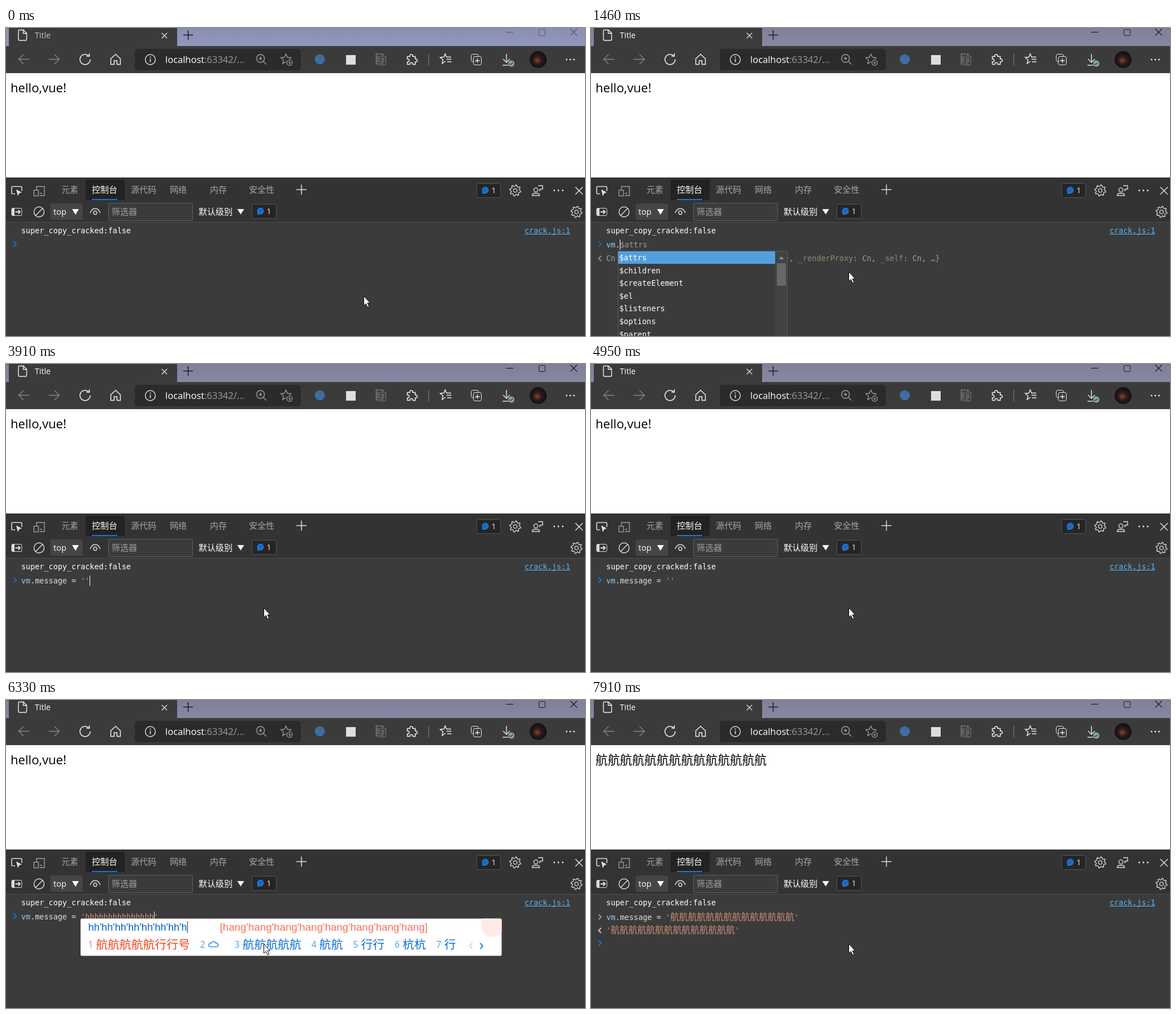
These frames come from a looping animation (1025x546 px, 8000 ms). An HTML page with a canvas:

```html
<!DOCTYPE html>
<html lang="zh-CN">
<head>
<meta charset="utf-8">
<title>Console demo</title>
<style>
html, body { margin: 0; width: 100%; height: 100%; overflow: hidden; background: #3b3b3b; }
canvas { display: block; width: 1025px; height: 546px; }
</style>
</head>
<body>
<canvas id="stage" width="1025" height="546"></canvas>
<script>
const g = document.getElementById('stage').getContext('2d');
const LOOP = 8000;
const UI = '"Open Sans", "Noto Sans CJK SC", "Noto Sans CJK", sans-serif';
const MONO = '"DejaVu Sans Mono", "Noto Sans CJK SC", "Noto Sans CJK", monospace';
const ARIAL = '"Liberation Sans", "Noto Sans CJK SC", sans-serif';
const CH = 8.1, LEFT = 27;
const STR = '#ce9178', LIGHT = '#dcdcdc', GREY = '#9a9a9a', BLUE = '#1a73d9';
const HANG = '航'.repeat(14);

// ---- drawing helpers ----
function box(x, y, w, h, fill) {
  g.fillStyle = fill;
  g.fillRect(x, y, w, h);
}
function round(x, y, w, h, r, fill, line) {
  g.beginPath();
  g.roundRect(x, y, w, h, r);
  if (fill) { g.fillStyle = fill; g.fill(); }
  if (line) { g.strokeStyle = line; g.lineWidth = 1; g.stroke(); }
}
function disc(x, y, r, fill) {
  g.beginPath();
  g.arc(x, y, r, 0, 7);
  g.fillStyle = fill;
  g.fill();
}
function ring(x, y, r, color, w = 1.4) {
  g.beginPath();
  g.arc(x, y, r, 0, 7);
  g.strokeStyle = color;
  g.lineWidth = w;
  g.stroke();
}
function stroke(d, color = '#eee', w = 1.4) {
  g.strokeStyle = color;
  g.lineWidth = w;
  g.stroke(new Path2D(d));
}
function fill(d, color) {
  g.fillStyle = color;
  g.fill(new Path2D(d));
}
function text(s, x, y, size, color, family = UI) {
  g.font = size + 'px ' + family;
  g.fillStyle = color;
  g.fillText(s, x, y);
  return x + g.measureText(s).width;
}
function cross(x, y, r, color, w = 1.3) {
  stroke(`M${x - r} ${y - r}l${2 * r} ${2 * r}M${x + r} ${y - r}l${-2 * r} ${2 * r}`, color, w);
}
function plus(x, y, r, color, w = 1.5) {
  stroke(`M${x - r} ${y}h${2 * r}M${x} ${y - r}v${2 * r}`, color, w);
}
function dots(x, y, gap, r = 1.4) {
  for (let i = -1; i < 2; i++) disc(x + i * gap, y, r, '#eee');
}
function star(x, y, r, color) {
  g.beginPath();
  for (let i = 0; i < 10; i++) {
    const a = i * Math.PI / 5 - Math.PI / 2, k = i % 2 ? r * 0.47 : r;
    g.lineTo(x + k * Math.cos(a), y + k * Math.sin(a));
  }
  g.closePath();
  g.strokeStyle = color;
  g.lineWidth = 1.3;
  g.stroke();
}
function gear(x, y) {
  g.beginPath();
  for (let i = 0; i < 32; i++) {
    const a = (i + 0.5) * Math.PI / 16, k = i % 4 < 2 ? 9.8 : 7.4;
    g.lineTo(x + k * Math.cos(a), y + k * Math.sin(a));
  }
  g.closePath();
  g.strokeStyle = '#ddd';
  g.lineWidth = 1.3;
  g.stroke();
  ring(x, y, 3.2, '#ddd', 1.3);
}
function badge(x, y, w, h) {
  round(x + .5, y + .5, w, h, 2, '#252526', '#555');
  disc(x + 15.5, y + 12.5, 6, BLUE);
  fill(`M${x + 10} ${y + 14}v5h5z`, BLUE);
  stroke(`M${x + 13} ${y + 11}h5.5M${x + 13} ${y + 14}h3.5`, '#14406f', 1.2);
  text('1', x + 26.5, y + 17.5, 14, '#eee');
}

// ---- browser window ----
function browser(active, pageText) {
  const bar = g.createLinearGradient(0, 0, 0, 32);
  bar.addColorStop(0, active ? '#7f8099' : '#8a90b3');
  bar.addColorStop(1, active ? '#8688a3' : '#9197ba');
  box(0, 0, 1025, 32, bar);
  box(0, 32, 1025, 48, '#3b3b3b');
  round(5, -8, 298, 42, 4, '#3b3b3b');
  stroke('M23.500 3.500h7.500l5.500 5.500v11q0 2-2 2h-10.500q-2 0-2-2v-14.500q0-2 1.500-2M30.500 4v5.500h6');
  text('Title', 51, 17.5, 14.2, active ? '#fff' : '#c4c4c4');
  cross(280.5, 13.5, 4.8, '#ddd');
  plus(322.5, 12.5, 8.5, '#1c1c20');
  const cap = active ? '#1c1c20' : '#565a70';
  stroke('M885 7.500h13', cap, 1.2);
  round(943.5, 2.5, 11, 11, 1.5, null, cap);
  cross(1005, 7.5, 6, cap, 1.2);

  stroke('M41 55.500h-18M31 47l-8.500 8.500 8.500 8.500', '#858585');
  stroke('M76 55.500h18M86 47l8.500 8.500-8.500 8.500', '#858585');
  stroke('M146.500 49.500a9 9 0 1 0 2.500 6M147.500 45v5h-5', '#eee', 1.6);
  stroke('M185.500 54.500l8.500-8 8.500 8v10h-6v-6.500h-5v6.500h-6z', '#eee', 1.5);
  round(228, 37, 294, 38, 5, '#2b2b2b');
  ring(255.5, 56, 9, '#ddd');
  stroke('M255.500 54.500v6', '#ddd', 1.6);
  disc(255.5, 51.6, 1.1, '#ddd');
  const x = text('localhost', 282, 62, 16.5, '#fff');
  text(':63342/...', x, 62, 16.5, '#9a9a9a');
  ring(450.5, 54, 7, '#a0a0a0');
  stroke('M455.500 59l5.500 5.500M447.500 54h6M450.500 51v6', '#a0a0a0');
  star(495.5, 55.5, 9.5, '#a0a0a0');
  disc(502, 61.5, 6.5, '#2b2b2b');
  ring(502, 61.5, 4.8, '#a0a0a0', 1.2);
  plus(502, 61.5, 2.6, '#a0a0a0', 1.2);
  disc(555.5, 55.5, 9, '#3c6f9f');
  box(602, 48, 17, 17, '#dedede');
  stroke('M659 64h-3.500v-18h12v3', '#7c7c7c', 1.7);
  round(660.5, 50, 12, 15.5, 1, null, '#7c7c7c');
  stroke('M663 54h7M663 57h7M663 60h7M663 63h5M658 50v11', '#7c7c7c', 1.4);
  stroke('M710.500 50.500h4.500a2.700 2.700 0 1 1 5 0h4.500v4.500a2.700 2.700 0 1 1 0 5v4.500h-4.500a2.600 2.600 0 1 0-5 0h-4.500v-4.500a2.600 2.600 0 1 0 0-5z', '#eee', 1.5);
  stroke('M748.500 46v20', '#777', 1.2);
  stroke('M778 59l-6 4 1.700-6.500-5-4.500 6.300-.5 2.500-5.800 2.500 5.800h8M780 55.500h8.500M781 60h7.500', '#eee', 1.4);
  round(823.5, 46.5, 13, 13, 3, null, '#eee');
  round(827.5, 50.5, 14, 15, 3, '#3b3b3b', '#eee');
  plus(834.5, 58, 4, '#eee', 1.3);
  stroke('M886 46v14M880 55l6 6 6-6M879 66h10', '#ddd', 1.5);
  disc(894.5, 63, 5.5, '#83ad99');
  stroke('M891.500 63l2 2 4-4', '#24362e', 1.2);
  const photo = g.createRadialGradient(940, 58, 1, 942, 56, 15);
  photo.addColorStop(0, '#7a3f2c');
  photo.addColorStop(.45, '#30191a');
  photo.addColorStop(1, '#100f14');
  disc(942, 56, 15, photo);
  dots(999, 56, 6.5);

  box(0, 80, 1025, 185, '#fff');
  text(pageText, 8, 114, pageText === HANG ? 21.65 : 22.1, '#000');
}

// ---- devtools frame ----
function devtools() {
  box(0, 265, 1025, 80, '#333');
  box(0, 345, 1025, 201, '#3b3b3b');
  box(0, 344, 1025, 1, '#4d4d4d');
  box(141, 269, 69, 36, '#222');
  box(152, 303, 45, 2, BLUE);
  stroke('M16 294h-4q-2 0-2-2v-9q0-2 2-2h14q2 0 2 2v6', '#ddd', 1.6);
  fill('M18 286l10 5.500-4.500 1.500-2.500 5z', '#ddd');
  stroke('M54 288v-7h14v16h-8M49.500 287.500h8v10h-8zM60 293h4', '#9a9a9a');
  [['元素', 98], ['控制台', 152], ['源代码', 221], ['网络', 290], ['内存', 361], ['安全性', 430]]
    .forEach(([s, x]) => text(s, x, 292, 15, x === 152 ? '#fff' : '#a6a6a6'));
  plus(523, 286.5, 9, '#ddd');
  badge(833, 275, 42, 25);
  gear(901.5, 288);
  ring(938, 287, 3.6, '#ddd');
  stroke('M931.500 297q0-4 4-4h5q4 0 4 4zM942 279.500h8v6h-3l-2 2.500v-2.500', '#ddd');
  dots(978, 288, 7.5);
  cross(1014.5, 288.5, 6.5, '#ddd', 1.5);

  round(10, 319.5, 18, 13, 2, null, '#ddd');
  box(10, 320, 5, 12, '#ddd');
  stroke('M16.500 326h8M21.500 322.500l3.500 3.500-3.500 3.500', '#ddd', 1.8);
  ring(58.5, 326, 9, '#ddd');
  stroke('M52.500 332.500l12.500-13', '#ddd');
  round(79, 311, 57, 29, 2, '#454545');
  text('top', 84, 331, 14.6, '#fff');
  fill('M117 321h12l-6 10z', '#fff');
  stroke('M149 328q3-8 9-8t9 8', '#ddd', 1.5);
  ring(158, 327.5, 3, '#ddd');
  round(181.5, 310.5, 149, 31, 2, '#3b3b3b', '#5e5e5e');
  text('筛选器', 187, 331, 15, '#a0a0a0');
  text('默认级别', 341, 331, 15, '#fff');
  fill('M409.500 321h12l-6 9.500z', '#fff');
  badge(435, 312, 43, 25);
  gear(1010, 326);

  text('super_copy_cracked:false', LEFT, 364, 13.45, '#fff', MONO);
  text('crack.js:1', 918, 364, 13.45, '#5fb2f2', MONO);
  box(918, 365, 81, 1, '#5fb2f2');
}

// ---- console lines ----
function spans(x, y, parts) {
  for (const [s, color] of parts) {
    const size = /[\u4e00-\u9fff]/.test(s) ? 15.7 : 13.45;
    x = text(s, x, y, size, color, MONO);
  }
  return x;
}
const quoted = (s, color = STR) => [["'", color], [s, color], ["'", color]];
function entered(s, y) {
  const [code, str] = s.split(/'/);
  const parts = [[code.slice(0, 2), '#8fcbee'], [code.slice(2), LIGHT]];
  return spans(LEFT, y, str === undefined ? parts : parts.concat(quoted(str)));
}
function chevron(y, color, dir = 1) {
  const x = dir > 0 ? 13.5 : 18;
  stroke(`M${x} ${y - 4.5}l${4.5 * dir} 4.5l${-4.5 * dir} 4.5`, color, 1.9);
}
function preview(s) {
  chevron(408.5, '#8f8f8f', -1);
  if (s[0] === "'") return spans(LEFT, 412.5, [[s, '#8f6e61']]);
  spans(LEFT, 412.5, s.split(/([\w$]+(?=:))/).map((p, i) => [p, i % 2 ? '#8b8e77' : '#a0a0a0']));
}
function caret(x, y) {
  box(Math.round(x), y - 14, 1, 18, '#fff');
}
function popup(x, items) {
  box(x, 395, 348 - x, 160, '#3b3b3b');
  round(x + .5, 395.5, 347 - x, 170, 0, null, '#5b5b5b');
  box(x + 1, 396, 325 - x, 22, '#529fe0');
  items.forEach((s, i) => text(s, x + 3, 412 + i * 22.6, 13.45, '#fff', MONO));
  box(326, 396, 21, 150, '#424242');
  fill('M332 410l5-5 5 5z', '#8c8c8c');
  box(329, 417, 16, 40, '#686868');
}

const L = {
  v: ['visualViewport', 'valueOf', 'vm', 'VTTCue', 'VTTRegion', 'ValidityState', 'VideoColorSpace'],
  vm: ['vm', 'VideoFrame', 'HTMLVideoElement', 'SVGAnimateElement', 'SVGAnimatedLength', 'SVGImageElement', 'SVGMarkerElement'],
  dot: ['$attrs', '$children', '$createElement', '$el', '$listeners', '$options', '$parent'],
  m: ['message', '$mount', '$emit', '$createElement', '_isMounted', '_computedWatchers', '_renderProxy'],
  all: ['alert', 'AbortController', 'AbortSignal', 'AnalyserNode', 'Animation', 'AnimationEffect', 'AnimationEvent']
};
const VIEW = 'VisualViewport {offsetLeft: 0, offsetTop: 0, pageLeft: 0, pageTop: 0, width: 683.3333129882812, …}';
const CN = 'Cn {_uid: 0, _isVue: true, $options: {…}, _renderProxy: Cn, _self: Cn, …}';
const HELLO = "'hello,vue!'";
const MSG = 'vm.message';

// time, typed text, caret column (-1 hidden), ghost, popup x, popup list, preview
const STEPS = [
  [0, '', -1],
  [190, '', 0],
  [340, 'v', 1],
  [380, 'v', 1, 'isualViewport', 22, L.v],
  [530, 'v', 1, 'isualViewport', 22, L.v, VIEW],
  [930, 'vm', 2, '', 22, L.vm],
  [1020, 'vm', 2, '', 22, L.vm, CN],
  [1460, 'vm.', 3, '$attrs', 47, L.dot, CN],
  [1610, 'vm.', 3, '$attrs', 47, L.dot, '{}'],
  [1950, 'vm.m', 4, 'essage', 47, L.m, '{}'],
  [2030, 'vm.me', 5, 'ssage', 47, L.m, HELLO],
  [2120, 'vm.mes', 6, 'sage', 47, L.m, HELLO],
  [2200, 'vm.mess', 7, 'age', 47, L.m, HELLO],
  [2550, MSG, 10, '', 0, null, HELLO],
  [3090, MSG, -1, '', 0, null, HELLO],
  [3230, MSG + ' ', 11, '', 102, L.all, HELLO],
  [3430, MSG + ' =', 12],
  [3530, MSG + ' = ', 13, '', 127, L.all],
  [3770, MSG + " = ''", 15, '', 127, L.all],
  [3910, MSG + " = ''", 15],
  [4440, MSG + " = ''", 14],
  [4950, MSG + " = ''", -1]
];

function typing(t) {
  const [, s, col, ghost, px, items, result] = STEPS.filter(p => p[0] <= t).pop();
  const dim = (t >= 1460 && t < 1950) || (t >= 3770 && t < 4440);
  chevron(383, dim ? '#2b62a3' : BLUE);
  const x = s ? entered(s, 388.5) : LEFT;
  if (ghost) text(ghost, x, 388.5, 13.45, GREY, MONO);
  if (result) preview(result);
  if (items) popup(px, items);
  if (col >= 0) caret(LEFT + col * CH - (col > 2 ? .4 : 0), 389);
}

// ---- input method window ----
function keys(t) {
  if (t < 5740) return 1;
  if (t < 5930) return 2;
  const d = t - 5930;
  return Math.min(28, 2 + Math.floor((d - d % 50 + 30) / 31.5));
}
function choices(n) {
  if (n === 1) return ['和', '', 'h', '会', '好', '还', '后'];
  if (n === 2) return ['行', '', 'hh', '航', '杭', '夯', '吭'];
  const k = Math.ceil(n / 2);
  const first = n % 2 && k > 3 ? '航'.repeat(k - 3) + '行行号' : '航'.repeat(k);
  return [first, '', '航'.repeat(Math.min(5, k)), '航航', '行行', '杭杭', '行'];
}
function inputWindow(t, n) {
  const pairs = [];
  for (let i = 0; i < n; i += 2) pairs.push(n - i > 1 ? 'hh' : 'h');
  const typed = pairs.join("'");
  const sound = '[' + pairs.map(() => 'hang').join("'") + ']';
  const left = Math.round(142 - Math.max(0, n - 2) * .78), x0 = left + 13.5;
  const gap = n < 3 ? 35 : 29;

  g.font = '18.1px ' + ARIAL;
  const typedEnd = x0 + g.measureText(typed).width;
  g.font = '18.7px ' + ARIAL;
  const soundEnd = typedEnd + 58 + g.measureText(sound).width;
  g.font = '20.8px ' + UI;
  let end = x0 - 18;
  const list = choices(n).map(s => {
    const x = end + 18;
    end = x + 14 + (s ? g.measureText(s).width : gap);
    return [s, x];
  });
  const right = Math.max(end + 81, soundEnd + 40);

  g.save();
  round(left, 387.5, right - left, 66, 2, '#fff');
  g.clip();
  disc(right - 16, 400, 20, '#fdebe6');
  text(typed, x0, 409, 18.1, '#0a62c4', ARIAL);
  box(Math.round(typedEnd), 392, 1, 21, '#333');
  text(sound, typedEnd + 58, 409, 18.7, '#fb7258', ARIAL);
  list.forEach(([s, x], i) => {
    text(i + 1, x, 439, 15.5, i ? '#4a9be6' : '#fb7258');
    if (s) return text(s, x + 14, 441, 20.8, i ? '#0a6fd6' : '#f5401f');
    g.globalAlpha = n < 3 && t >= 5590 ? .07 : 1;
    stroke(`M${x + 18} 437.500a3.200 3.200 0 0 1 1-6.400a5 5 0 0 1 9 0a3.200 3.200 0 0 1 1 6.400z`, '#2f8be0', 1.6);
    g.globalAlpha = 1;
    if (n < 3) fill(`M${x + 39.5} 442h9l-4.500 4z`, '#8cc4ee');
  });
  stroke(`M${right - 52} 431l-4.500 5 4.500 5`, '#a5d0f2', 1.6);
  stroke(`M${right - 38} 431l4.500 5-4.500 5`, '#0a6fd6', 1.8);
  g.restore();
}

function composing(t) {
  const n = keys(t);
  chevron(383, BLUE);
  entered(MSG + " = '" + 'h'.repeat(n) + "'", 388.5);
  caret(LEFT + (14 + n) * CH, 389);
  inputWindow(t, n);
}

function committed(t) {
  const done = t >= 7370;
  chevron(done ? 384.5 : 383, done ? '#9a9a9a' : BLUE);
  const x = entered(MSG + " = '" + HANG + "'", 389.5);
  if (!done) return caret(x - CH, 389);
  chevron(408.5, '#c4c4c4', -1);
  spans(LEFT, 413, quoted(HANG));
  chevron(431, BLUE);
  if (t < 7910) caret(LEFT, 437);
}

// ---- mouse pointer ----
const PATH = [[0, 633, 475], [30, 590, 467], [80, 520, 450], [130, 472, 437], [190, 458, 433], [340, 456, 432]];
function pointer(t) {
  const [, x, y] = PATH.filter(p => p[0] <= t).pop();
  const d = `M${x + .5} ${y + .5}v16.500l3.700-3.500 2.800 6.500 2.700-1.200-2.800-6.300h4.800z`;
  fill(d, '#fff');
  stroke(d, '#111', 1);
}

function draw(t) {
  browser(t >= 190, t >= 7420 ? HANG : 'hello,vue!');
  devtools();
  if (t < 5430) typing(t);
  else if (t < 7080) composing(t);
  else committed(t);
  pointer(t);
}

let start;
function tick(now) {
  if (start === undefined) start = now;
  draw((now - start) % LOOP);
  requestAnimationFrame(tick);
}
requestAnimationFrame(tick);
</script>
</body>
</html>
```
